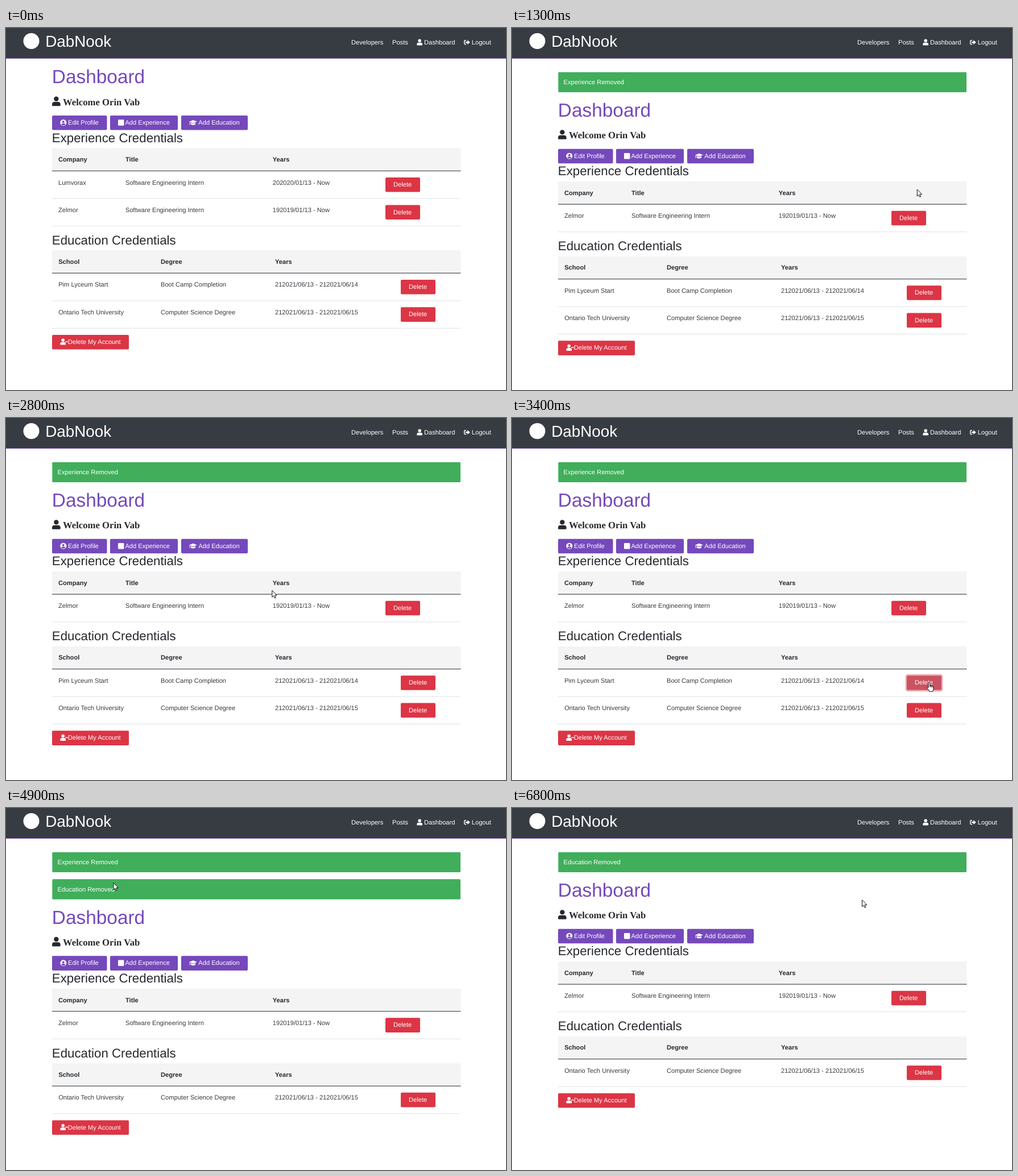
Recreate the animation shown at these times as an HTML page. Size 879 px wide and 637 px high, loop 7200 ms.

```html
<!DOCTYPE html>
<html lang="en">
<head>
<meta charset="utf-8">
<title>Dashboard</title>
<style>
  html, body { margin: 0; width: 100%; height: 100%; overflow: hidden; background: #fff; }
  svg { display: block; width: 100%; height: 100%; }
  text {
    font-family: "Liberation Sans", Arial, sans-serif;
    font-size: 11.14px;
    white-space: pre;
    text-rendering: geometricPrecision;
  }
  .serif { font-family: "Liberation Serif", "Times New Roman", serif; }
</style>
</head>
<body>
<svg viewBox="0 0 879 637">
  <g id="page"></g>
  <g id="pointer"></g>
</svg>
<script>
const LOOP = 7200;
const PURPLE = '#7549bb', RED = '#dc3545', GREEN = '#40ae5b', DARK = '#25282d', BODY = '#383a3e';
const FIRST_ALERT = 58.7, NEXT_ALERT = 47.6, ROW = 48.4;

const experience = [
  { cells: ['Lumvorax', 'Software Engineering Intern', '202020/01/13 - Now'], pressed: 1050, removed: 1300 },
  { cells: ['Zelmor', 'Software Engineering Intern', '192019/01/13 - Now'] }
];
const education = [
  { cells: ['Pim Lyceum Start', 'Boot Camp Completion', '212021/06/13 - 212021/06/14'], pressed: 3300, removed: 3550 },
  { cells: ['Ontario Tech University', 'Computer Science Degree', '212021/06/13 - 212021/06/15'] }
];
const alerts = [
  { label: 'Experience Removed', from: 1300, to: 5150 },
  { label: 'Education Removed', from: 3550, to: LOOP }
];

// Pointer stops: time, x, y
const stops = [
  [0, 892, 555], [100, 892, 555], [700, 712.3, 284], [1300, 712.3, 284],
  [1900, 140.5, 104.3], [2400, 140.5, 104.3], [3150, 733.6, 465], [3550, 733.6, 465],
  [4000, 128.5, 122.5], [4700, 128.5, 122.5], [5300, 360, 158], [5650, 360, 158],
  [6500, 615.5, 161.8], [LOOP, 615.5, 161.8]
];

const rect = (x, y, w, h, fill, r = 0, extra = '') =>
  `<rect x="${x}" y="${y}" width="${w}" height="${h}" rx="${r}" fill="${fill}" ${extra}/>`;
const text = (x, y, label, fill = BODY, extra = '') =>
  `<text x="${x}" y="${y}" fill="${fill}" ${extra}>${label}</text>`;
const sized = (size, extra = '') => `style="font-size:${size}px" ${extra}`;
const at = (x, y, content, scale = 1) =>
  `<g transform="translate(${x} ${y}) scale(${scale})">${content}</g>`;

// Icons are drawn about 11 units high
const user = fill => `<g fill="${fill}"><circle cx="4.9" cy="2.8" r="2.8"/>
  <path d="M2.9 6.3H6.9Q9.8 6.3 9.8 9.2V10.1Q9.8 11.1 8.8 11.1H1Q0 11.1 0 10.1V9.2Q0 6.3 2.9 6.3z"/></g>`;
const logoutIcon = `<path d="M4 2H2.2Q.8 2 .8 3.4V7.6Q.8 9 2.2 9H4" fill="none" stroke="#fff" stroke-width="1.5"/>
  <path d="M3 4.2H6.2V1.6L10.9 5.5 6.2 9.4V6.8H3z" fill="#fff"/>`;
const profileIcon = `<circle cx="5.5" cy="5.5" r="5.5" fill="#fff"/>
  <g fill="${PURPLE}"><circle cx="5.5" cy="4.1" r="2"/><path d="M2 8.9Q2.3 6.8 4 6.8H7Q8.7 6.8 9 8.9 5.5 11.4 2 8.9z"/></g>`;
const capIcon = `<path d="M0 3.7L7 1 14 3.7 7 6.4zM3 5.7V8.7Q7 11 11 8.7V5.7L7 7.3z" fill="#fff"/>
  <path d="M1.2 4V9.3" stroke="#fff"/>`;

const navbar = rect(0, 0, 879, 53.5, '#373b42') + rect(0, 53, 879, .7, PURPLE) +
  '<circle cx="44.5" cy="23" r="14" fill="#fff"/>' +
  text(69.2, 33, 'DabNook', '#fff', sized(27.84)) +
  text(607, 29, 'Developers', '#fff') + text(679, 29, 'Posts', '#fff') +
  at(722.3, 19.5, user('#fff')) + text(735, 29, 'Dashboard', '#fff') +
  at(805, 19.7, logoutIcon) + text(818.8, 29, 'Logout', '#fff');

const button = (x, y, w, labelX, label, fill, icon = '') =>
  rect(x, y, w, 25.6, fill, 2) + icon + text(labelX, y + 16.1, label, '#fff');

const header = rect(81, 0, 718.5, 0, 'none') +
  text(80.8, 97.3, 'Dashboard', PURPLE, sized(33.4)) +
  at(81, 120.5, user(DARK), 1.5) +
  text(100, 135.5, 'Welcome Orin Vab', DARK, sized(16.7, 'class="serif" font-weight="bold"')) +
  button(81, 154, 96.5, 109, 'Edit Profile', PURPLE, at(95.3, 161, profileIcon)) +
  button(183, 154, 119, 209.4, 'Add Experience', PURPLE, rect(197, 161.3, 10.4, 10.4, '#fff', 1)) +
  button(308, 154, 117, 338.3, 'Add Education', PURPLE, at(322, 161, capIcon));

function deleteButton(x, y, pointer, focused) {
  const over = pointer.x > x && pointer.x < x + 61 && pointer.y > y && pointer.y < y + 25.6;
  if (over) pointer.kind = 'hand';
  const ring = focused ? rect(x - 1.2, y - 1.2, 63.4, 28, 'none', 3, 'stroke="#f1afb6" stroke-width="2.4"') : '';
  return ring + button(x, y, 61, x + 14, 'Delete', focused ? '#c95361' : over ? '#bc3040' : RED);
}

// Draws one titled table with its heading baseline at y; returns the markup and the bottom edge
function table(y, title, heads, columns, deleteX, rows, t, pointer) {
  const top = y + 10.8;
  let bottom = top + 40;
  let out = text(80.8, y, title, DARK, sized(22.27)) + rect(81, top, 718.5, 40, '#f4f4f4') +
    heads.map((h, i) => text(columns[i], top + 23.7, h, DARK, 'font-weight="bold"')).join('') +
    rect(81, bottom - .7, 718.5, 1.3, '#555a60');
  for (const row of rows.filter(r => !(t >= r.removed))) {
    out += row.cells.map((c, i) => text(columns[i], bottom + 24, c)).join('') +
      deleteButton(deleteX, bottom + 11.5, pointer, t >= row.pressed);
    bottom += ROW;
    out += rect(81, bottom - .4, 718.5, 1, '#dee2e6');
  }
  return [out, bottom];
}

function page(t, pointer) {
  const active = alerts.filter(a => t >= a.from && t < a.to);
  const shift = active.length ? FIRST_ALERT + (active.length - 1) * NEXT_ALERT : 0;
  let out = navbar;
  active.forEach((a, i) => {
    const y = 77.7 + i * NEXT_ALERT;
    out += rect(81.3, y, 717.7, 35.4, GREEN, 1.5) + text(90.6, y + 21.6, a.label, '#fff');
    if (pointer.x > 90 && pointer.x < 197 && Math.abs(pointer.y - y - 17.7) < 9) pointer.kind = 'beam';
  });
  const [jobs, jobsEnd] = table(200.7 + shift, 'Experience Credentials', ['Company', 'Title', 'Years'],
    [92, 210, 468.8], 667, experience, t, pointer);
  const [schools, schoolsEnd] = table(jobsEnd + 32.3, 'Education Credentials', ['School', 'Degree', 'Years'],
    [92.2, 272, 473], 694, education, t, pointer);
  const y = schoolsEnd + 11.8;
  return out + at(0, shift, header) + jobs + schools +
    button(81, y, 135, 108.8, 'Delete My Account', RED,
      at(95.3, y + 6.5, user('#fff')) + rect(104.3, y + 11.3, 4.6, 1.5, '#fff'));
}

const shapes = {
  arrow: '<path d="M0 0V12L2.8 9.4 4.7 13.6 6.5 12.8 4.7 8.7H8.4z" fill="#fff" stroke="#111"/>',
  beam: '<path d="M-2.5-5.5H-.6L0-5 .6-5.5H2.5M0-5V5M-2.5 5.5H-.6L0 5 .6 5.5H2.5" fill="none" stroke="#111"/>',
  hand: `<path d="M-1.5 9.5V1.2a1.3 1.3 0 0 1 2.6 0V6L6 7.2Q7.3 7.6 7.3 9V12Q7.3 13.5 6.4 15V16.3H0V15L-4 10.2
    Q-4.2 8.4-2.8 8.5z" fill="#fff" stroke="#111"/><path d="M1.2 6V9M3.3 6.8V9.2M5.3 7.4V9.4" stroke="#111" stroke-width=".8"/>`
};

function pointerAt(t) {
  const i = stops.findIndex(s => s[0] > t);
  const [t0, x0, y0] = stops[i - 1], [t1, x1, y1] = stops[i];
  const u = (t - t0) / (t1 - t0), e = u * u * (3 - 2 * u);
  return { x: x0 + (x1 - x0) * e, y: y0 + (y1 - y0) * e, kind: 'arrow' };
}

const pageNode = document.getElementById('page');
const pointerNode = document.getElementById('pointer');
let shown = '';

function draw() {
  const t = performance.now() % LOOP;
  const pointer = pointerAt(t);
  const markup = page(t, pointer);
  if (markup !== shown) pageNode.innerHTML = shown = markup;
  pointerNode.innerHTML = at(pointer.x, pointer.y, shapes[pointer.kind]);
  requestAnimationFrame(draw);
}
draw();
</script>
</body>
</html>
```
